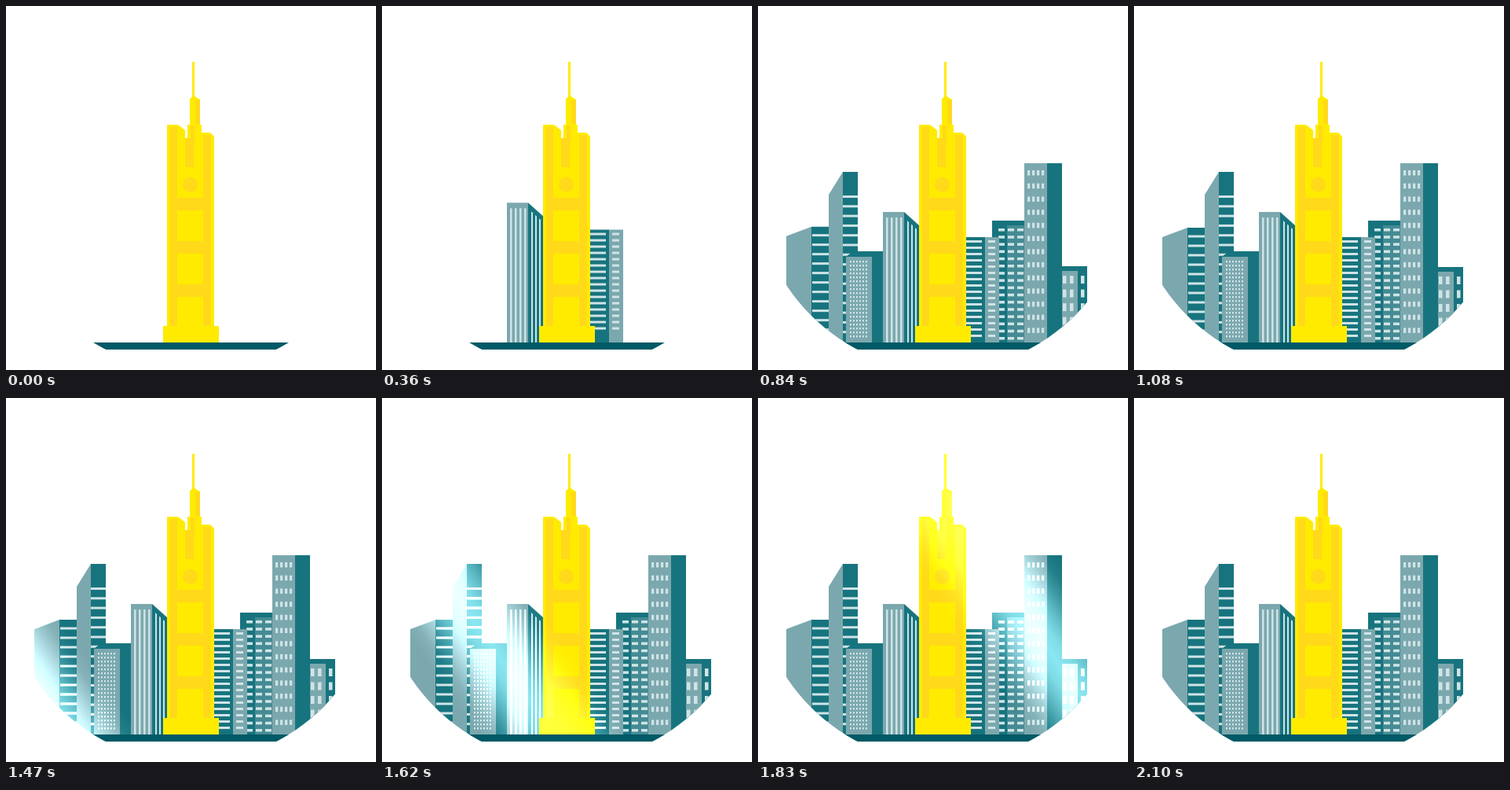
Write an HTML page with a canvas that moves like this. It is 471x463 px and loops after 2.7 s.

```html
<!DOCTYPE html>
<html lang="en">
<head>
<meta charset="utf-8">
<title>Skyline</title>
<style>
html, body { margin: 0; width: 100%; height: 100%; overflow: hidden; background: #fff; }
canvas { display: block; width: 471px; height: 463px; }
</style>
</head>
<body>
<canvas id="stage" width="471" height="463"></canvas>
<script>
const W = 471, H = 463, LOOP = 2700, STEP = 30, GROUND = 428;
const LIGHT = '#7ba8ae', DARK = '#17747e', MID = '#458b94', PALE = '#d0e4e7', BASE = '#005966';
const YELLOW = '#ffeb00', GOLD = '#ffd91a';
const ctx = document.getElementById('stage').getContext('2d');

function box(x, y, w, h, color) {
  ctx.fillStyle = color;
  ctx.fillRect(x, y, w, h);
}

// Upright wall whose top edge runs from height y1 on the left to y2 on the right.
function wall(x, w, y1, color, y2 = y1, bottom = H + 10) {
  ctx.fillStyle = color;
  ctx.beginPath();
  ctx.moveTo(x, y1);
  ctx.lineTo(x + w, y2);
  ctx.lineTo(x + w, bottom);
  ctx.lineTo(x, bottom);
  ctx.fill();
}

// Windows of size w by h, repeated across and down to the ground.
function grid(x, y, w, h, dy, cols = 1, dx = 0) {
  for (let row = y; row < GROUND - 4; row += dy)
    for (let c = 0; c < cols; c++) box(x + c * dx, row, w, h, PALE);
}

function disc(x, y, r) {
  ctx.beginPath();
  ctx.arc(x, y, r, 0, 2 * Math.PI);
}

function farLeft() {
  wall(36, 32, 294, LIGHT, 282);
  wall(68, 22, 282, DARK);
  grid(69, 291.5, 21, 3, 12);
}

function tallLeft() {
  wall(90, 18, 240, LIGHT, 211);
  wall(108, 19, 211, DARK);
  grid(108, 241, 19, 3, 12.3);
}

function dotted() {
  wall(112, 9, 319, DARK, 312);
  wall(121, 38, 312, DARK);
  wall(112, 33, 319, LIGHT);
  grid(117, 324, 2, 2.4, 5, 6, 4);
}

function striped() {
  wall(159, 27, 262, LIGHT);
  wall(186, 19, 262, DARK, 279);
  for (let i = 0; i < 4; i++) wall(163 + 6 * i, 2.5, 269, PALE);
  for (let i = 0; i < 3; i++) wall(190 + 5 * i, 2, 273 + 4.5 * i, PALE, 275 + 4.5 * i);
}

function louvred() {
  wall(264, 25, 294, DARK);
  wall(289, 18, 294, LIGHT);
  grid(265, 298, 20, 3, 8);
  grid(293, 298, 9, 3, 8);
}

function backRight() {
  wall(298, 41, 273, DARK);
  wall(317, 22, 279, MID);
  grid(306, 283, 8, 3.5, 9.2, 3, 12);
}

function tallRight() {
  wall(339, 29, 200, LIGHT);
  wall(368, 19, 200, DARK);
  grid(343, 209, 3.2, 6.5, 16.7, 4, 6);
}

function farRight() {
  wall(387, 32, 332, DARK);
  wall(387, 20, 338, LIGHT);
  grid(388, 344, 4.5, 10, 17.5, 2, 9);
  grid(411, 344, 4.5, 10, 17.5);
}

function tower() {
  wall(205, 14, 151, YELLOW, 151, GROUND);
  wall(219, 9, 151, YELLOW, 158, GROUND);
  wall(228, 21, 168, YELLOW, 168, GROUND);
  wall(249, 11, 161, YELLOW, 161, GROUND);
  wall(260, 5, 161, YELLOW, 166, GROUND);
  wall(237, 3, 71, YELLOW, 71, 120);
  wall(234, 5, 118, YELLOW, 114, 151);
  wall(239, 8, 114, YELLOW, 119, 151);
  box(231, 151, 18, 18, YELLOW);

  box(241, 120, 6, 30, GOLD);
  box(235, 152, 5, 29, GOLD);
  box(228, 168, 11, 37, GOLD);
  box(209, 154, 9, 253, GOLD);
  box(251, 164, 10, 243, GOLD);
  for (let i = 0; i < 3; i++) box(218, 244 + 55 * i, 33, 16, GOLD);
  ctx.fillStyle = GOLD;
  disc(234.5, 227, 9.5);
  ctx.fill();
  box(200, 407, 71, GROUND - 407, YELLOW);
}

function backOut(k) {
  const u = 1 - Math.min(k, 1);
  return 1 - 2.4 * u ** 3 + 1.4 * u ** 2;
}

// Lifts a building of the given roof line out of the ground.
function rise(draw, top, age, span = 420) {
  if (age <= 0) return;
  ctx.save();
  ctx.translate(0, (1 - backOut(age / span)) * (GROUND - top));
  draw();
  ctx.restore();
}

// Diagonal band of added light sweeping from left to right.
function shine(t, strength) {
  const k = (t - 1320) / 780;
  if (k <= 0 || k >= 1) return;
  const eased = k / 2 + (1 - Math.cos(Math.PI * k)) / 4;
  const nx = 0.82, ny = -0.57, a = -338 + 550 * eased, b = a + 156;
  const g = ctx.createLinearGradient(a * nx, a * ny, b * nx, b * ny);
  for (let s = 0; s <= 1; s += 0.1) {
    const v = Math.round(strength * Math.sin(Math.PI * s) ** 2);
    g.addColorStop(s, `rgb(${v},${v},${v})`);
  }
  g.addColorStop(1, '#000');
  ctx.globalCompositeOperation = 'lighter';
  box(0, 0, W, H, g);
  ctx.globalCompositeOperation = 'source-over';
}

function render(t) {
  box(0, 0, W, H, '#fff');
  ctx.save();
  disc(235.5, 225, 238);
  ctx.clip();
  ctx.beginPath();
  ctx.rect(0, 0, W, 437);
  ctx.clip();

  rise(farLeft, 282, t - 660);
  rise(farRight, 332, t - 660);
  rise(tallLeft, 211, t - 405);
  rise(backRight, 273, t - 360, 370);
  rise(tallRight, 200, t - 405);
  rise(dotted, 312, t - 360, 370);
  rise(striped, 262, t - 100);
  rise(louvred, 294, t - 100);
  shine(t, 115);

  box(0, GROUND, W, 9, BASE);
  tower();
  ctx.beginPath();
  ctx.rect(205, 60, 60, 347);
  ctx.rect(200, 407, 71, GROUND - 407);
  ctx.clip();
  shine(t, 60);
  ctx.restore();
}

const begin = performance.now();
function tick() {
  const t = (performance.now() - begin) % LOOP;
  render(Math.floor(t / STEP) * STEP);
  requestAnimationFrame(tick);
}
tick();
</script>
</body>
</html>
```
